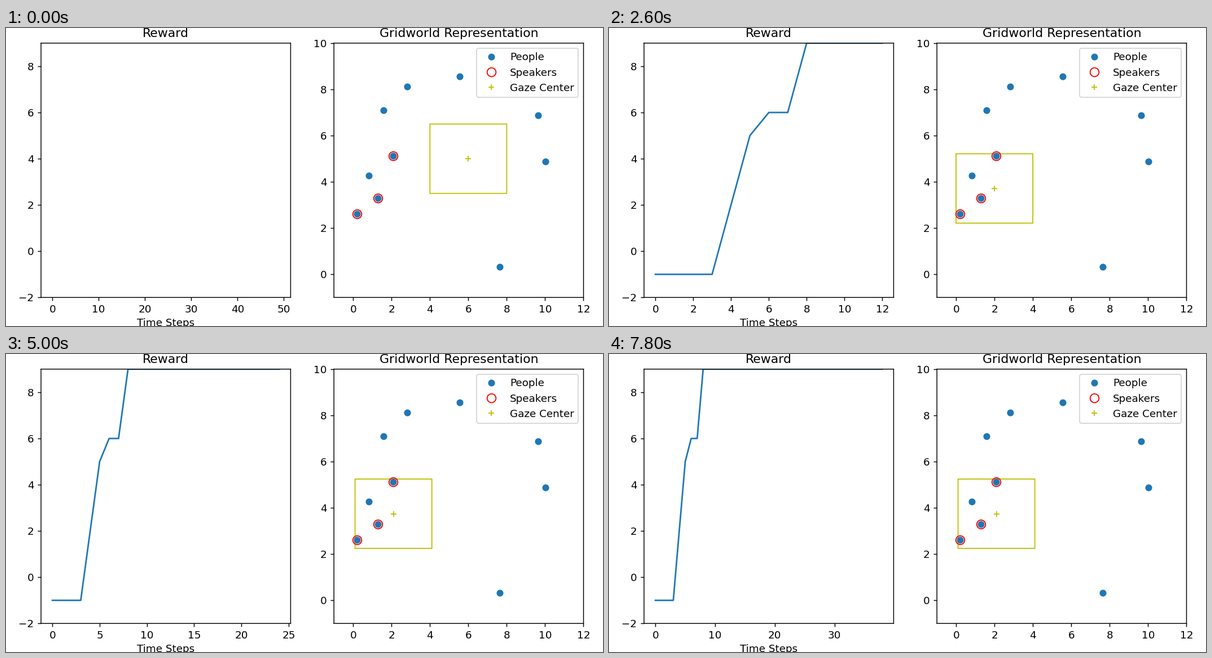
Write a matplotlib script that moves like this. It is 1058 px wide and 529 px high and loops after 8000 ms.

```python
import numpy as np
import matplotlib.pyplot as plt
from matplotlib.animation import FuncAnimation
from matplotlib.patches import Rectangle

STEPS = 40
LAST_STEP = 49          # x range shown before a run starts
APPROACH = 6            # steps at full speed
SETTLED = 13
DRIFT = 6

SPEAKERS = np.array([(0.20, 2.62), (1.28, 3.30), (2.07, 5.12)])
LISTENERS = np.array([(0.82, 4.27), (1.58, 7.10), (2.82, 8.12), (5.56, 8.55),
                      (9.63, 6.87), (10.02, 4.87), (7.63, 0.32)])
PEOPLE = np.vstack([SPEAKERS, LISTENERS])

VIEW = np.array([4, 3])
START = np.array([6, 5])
BRAKE = np.array([2.68, 4.14])
NEAR = np.array([1.99, 3.71])
REST = np.array([2.10, 3.745])


def smoothstep(t):
    t = np.clip(t, 0, 1)
    return t * t * (3 - 2 * t)


def gaze(step):
    """Steady approach, exponential braking, then a slow drift to rest."""
    if step <= APPROACH:
        return START + (BRAKE - START) * step / APPROACH
    braking = (BRAKE - NEAR) * 0.5 ** (step - APPROACH)
    return NEAR + braking + (REST - NEAR) * smoothstep((step - SETTLED) / DRIFT)


def count_seen(points, center):
    return np.sum(np.all(np.abs(points - center) <= VIEW / 2, axis=1))


def reward(step):
    center = gaze(step)
    return -1 + 3 * count_seen(SPEAKERS, center) + count_seen(LISTENERS, center)


rewards = [reward(step) for step in range(STEPS)]

fig, (ax_reward, ax_grid) = plt.subplots(1, 2, figsize=(8, 4), dpi=132.25)
fig.tight_layout()

ax_reward.set_title("Reward")
ax_reward.set_xlabel("Time Steps", labelpad=3.3)
ax_reward.set_ylim(-2, 9)
curve, = ax_reward.plot([], [])

ax_grid.set_title("Gridworld Representation")
ax_grid.set_xlim(-1, 12)
ax_grid.set_ylim(-1, 10)
ax_grid.plot(*PEOPLE.T, "o", color="C0", ms=5.6, label="People")
ax_grid.plot(*SPEAKERS.T, "o", color="r", ms=8.5, fillstyle="none", label="Speakers")
cross, = ax_grid.plot([], [], "y+", ms=5.5, label="Gaze Center")
view = ax_grid.add_patch(Rectangle((0, 0), *VIEW, fill=False, ec="y", snap=False))
ax_grid.legend(loc="upper right")

for ax in (ax_reward, ax_grid):
    for spine in ax.spines.values():
        spine.set_snap(False)


def update(step):
    curve.set_data(range(step), rewards[:step])
    if step == 0:
        margin = 0.05 * LAST_STEP
        ax_reward.set_xlim(-margin, LAST_STEP + margin)
    else:
        ax_reward.relim()
        ax_reward.autoscale(True, axis="x")
    center = gaze(step)
    cross.set_data(center[:1], center[1:])
    view.set_xy(center - VIEW / 2)
    return curve, cross, view


anim = FuncAnimation(fig, update, frames=STEPS, interval=200, repeat=True,
                     repeat_delay=0, blit=False)
plt.show()
```
